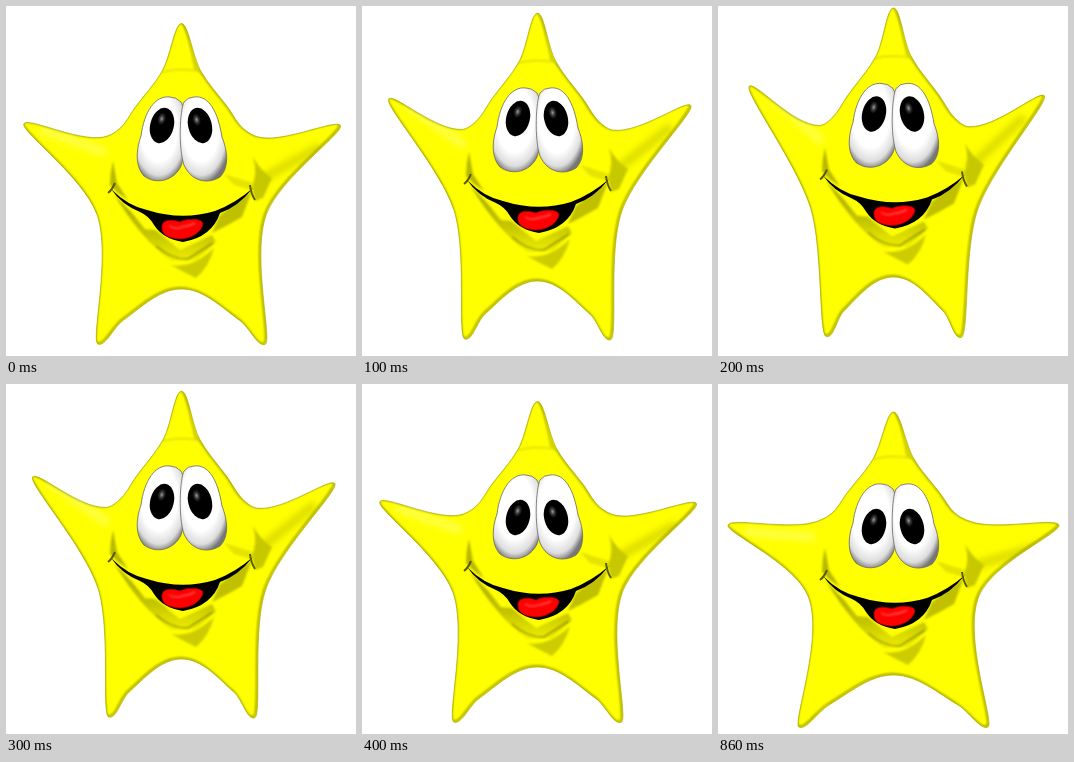
An HTML page for the animation above (1.1 s loop, 350 by 350 pixels).

```html
<!DOCTYPE html>
<html lang="en">
<head>
<meta charset="utf-8">
<title>Jumping star</title>
<style>
  html, body { margin: 0; width: 100%; height: 100%; overflow: hidden; background: #fff; }
  svg { display: block; width: 100vw; height: 100vh; }
</style>
</head>
<body>
<svg viewBox="0 0 350 350">
  <defs>
    <path id="outline"/>
    <clipPath id="inside"><use href="#outline"/></clipPath>
    <filter id="soft" x="0" y="0" width="350" height="350" filterUnits="userSpaceOnUse"><feGaussianBlur stdDeviation="3"/></filter>
    <filter id="fine" x="-30%" y="-30%" width="160%" height="160%"><feGaussianBlur stdDeviation=".8"/></filter>
    <radialGradient id="white" cx=".45" cy=".38" r=".65">
      <stop offset=".6" stop-color="#fff"/><stop offset=".85" stop-color="#ddd"/><stop offset="1" stop-color="#777"/>
    </radialGradient>
    <radialGradient id="black" cx=".42" cy=".32" r=".6">
      <stop offset="0" stop-color="#999"/><stop offset=".15" stop-color="#333"/><stop offset=".3" stop-color="#000"/>
    </radialGradient>
    <linearGradient id="chin" x1="0" y1="0" x2="0" y2="1">
      <stop offset="0" stop-color="#aaaa00"/><stop offset=".6" stop-color="#c4c400"/><stop offset="1" stop-color="#eeee00"/>
    </linearGradient>
    <ellipse id="pupil" rx="11.8" ry="18" fill="url(#black)"/>
  </defs>

  <use href="#outline" fill="#ff0" stroke="#a0a000" stroke-width=".6"/>
  <g clip-path="url(#inside)" fill="none">
    <path id="glow" stroke="#ffff70" stroke-width="9" stroke-linecap="round" opacity=".6" filter="url(#soft)"/>
    <path id="shade" stroke="#c8c800" stroke-width="9" opacity=".6" filter="url(#soft)"/>
    <use href="#outline" x="-1" y="-1" stroke="#a0a000" stroke-width="2" filter="url(#fine)"/>
    <g class="face" filter="url(#fine)">
      <path d="M156 75Q175 70 197 75" stroke="#c8c800"/>
      <path d="M182 40Q190 60 196 75L188 72Z" fill="#d4d400"/>
      <path d="M107 164Q104 176 104 188L112 196L122 203L111 186Z" fill="#b8b800"/>
      <path d="M247 160Q254 173 266 181L257 201L249 204L246 190Q252 176 247 160Z" fill="#c8c800"/>
      <path d="M218 177L247 186L245 193L228 188Z" fill="#e4e400"/>
      <path d="M246 194L236 220L220 229L206 236L214 218Z" fill="#c0c000"/>
      <path d="M108 197Q128 220 147 231L174 253L206 238L210 245L190 263L166 264Q136 244 108 197Z" fill="url(#chin)"/>
      <path d="M120 208Q142 226 150 233L139 232Z" fill="#ff0"/>
      <path d="M150 249Q166 263 182 262L207 246" stroke="#909000" stroke-width="1.5"/>
      <path d="M165 268Q186 272 208 251Q203 270 190 281L178 275Z" fill="#cccc00"/>
    </g>
  </g>

  <g class="face">
    <path d="M105 192Q122 209 141 213Q176 224 209 214Q230 206 247 191Q232 210 214 216Q206 240 177 245Q157 242 148 228Q143 219 134 215Q116 208 105 192Z"/>
    <path d="M156 231C155 222 166 222 174 225C181 221 197 221 197 227C195 235 186 242 173 242C161 241 156 237 156 231Z" fill="#f00" stroke="#a00000" stroke-width=".8"/>
    <path d="M163 229Q169 233 176 230Q184 229 189 226" fill="none" stroke="#ff5050" stroke-width="1.5" filter="url(#fine)"/>
    <path d="M102 196Q106 193 109 186M244 188Q245 197 249 203" fill="none" stroke="#5a5a00" stroke-width="2"/>

    <g fill="url(#white)" stroke="#666" stroke-width=".8">
      <path d="M164 100C149 98 138 115 135 139C130 153 129 169 138 179C150 188 168 184 175 169C181 152 180 113 175 105Q170 100 164 100Z"/>
      <path d="M188 100C203 98 212 115 216 140C222 155 223 171 214 180C201 188 185 184 178 168C172 150 174 113 178 105Q182 100 188 100Z"/>
    </g>
    <g id="pupils">
      <use href="#pupil" transform="translate(156 142.5) rotate(14)"/>
      <use href="#pupil" transform="translate(194 142.5) rotate(-14)"/>
    </g>
  </g>
</svg>
<script>
const byId = id => document.getElementById(id);
const STEP = 100, LOOP = 1100, AXIS = 175.5, RISE = 22.5;

// Right half of the star: resting place, travel at full lift, and rounding of tips.
const crown = { x: AXIS, y: 28, dx: 0, dy: -26, tip: 7 };
const crotch = { x: AXIS, y: 291, dx: 0, dy: -20 };
const collar = { x: 196, y: 75, dx: -3, dy: -25 };
const shoulder = { x: 222, y: 109, dx: -1, dy: -20 };
const bend = { x: 238, y: 130, dx: 0, dy: -17 };
const armpit = { x: 258, y: 139, dx: -8, dy: -19 };
const hand = { x: 341, y: 141, dx: -18, dy: -56, tip: 8 };
const waist = { x: 261, y: 212, dx: -2, dy: -9 };
const foot = { x: 270, y: 343, dx: -27, dy: -12, tip: 8 };
const thigh = { x: 240, y: 321, dx: -15, dy: -16 };
const half = [collar, shoulder, bend, armpit, hand, waist, foot, thigh];

// How far the body is lifted and how far the eyes look up, per step.
const lifts = [.4, .8, 1, .8, .4, 0];
const looks = [14, 12, 12, 7, 0, 0];

// The arms lean a little to one side near the top of the jump.
function place(key, lift, side = 1) {
  const reach = key.x + key.dx * lift - AXIS;
  const lean = 5 * lift ** 2 * (reach / 150) ** 3;
  return { x: AXIS + side * reach + lean * .7, y: key.y + key.dy * lift + side * lean, tip: key.tip };
}

function starPoints(lift) {
  const right = half.map(key => place(key, lift));
  const left = half.map(key => place(key, lift, -1)).reverse();
  return [place(crown, lift), ...right, place(crotch, lift), ...left];
}

const span = (a, b) => Math.hypot(b.x - a.x, b.y - a.y);
const unit = (a, b) => ({ x: (b.x - a.x) / span(a, b), y: (b.y - a.y) / span(a, b) });

// Closed smooth curve; short handles at the tips keep them pointed.
function smoothPath(points) {
  const n = points.length;
  const tangents = points.map((p, i) => {
    const before = unit(points[(i + n - 1) % n], p), after = unit(p, points[(i + 1) % n]);
    return unit({ x: 0, y: 0 }, { x: before.x + after.x, y: before.y + after.y });
  });
  const handle = (i, length) => {
    const p = points[i], size = Math.min(Math.abs(length), p.tip ?? Infinity) * Math.sign(length);
    return `${p.x + tangents[i].x * size} ${p.y + tangents[i].y * size}`;
  };
  const curves = points.map((p, i) => {
    const j = (i + 1) % n, q = points[j], third = span(p, q) / 3;
    return `C${handle(i, third)} ${handle(j, -third)} ${q.x} ${q.y}`;
  });
  return `M${points[0].x} ${points[0].y}${curves.join("")}Z`;
}

function armLine(lift, side, drop) {
  const from = place(armpit, lift, side), to = place(hand, lift, side);
  return `M${from.x} ${from.y + drop}L${to.x - side * 20} ${to.y + drop / 2}`;
}

function draw(time) {
  const step = Math.min(Math.floor(time % LOOP / STEP), lifts.length - 1);
  const lift = lifts[step];
  byId("outline").setAttribute("d", smoothPath(starPoints(lift)));
  byId("glow").setAttribute("d", armLine(lift, -1, 14));
  byId("shade").setAttribute("d", armLine(lift, 1, 42));
  for (const part of document.querySelectorAll(".face"))
    part.setAttribute("transform", `translate(0 ${-RISE * lift})`);
  byId("pupils").setAttribute("transform", `translate(0 ${-looks[step]})`);
}

const start = performance.now();
function tick() {
  draw(performance.now() - start);
  requestAnimationFrame(tick);
}
tick();
</script>
</body>
</html>
```
